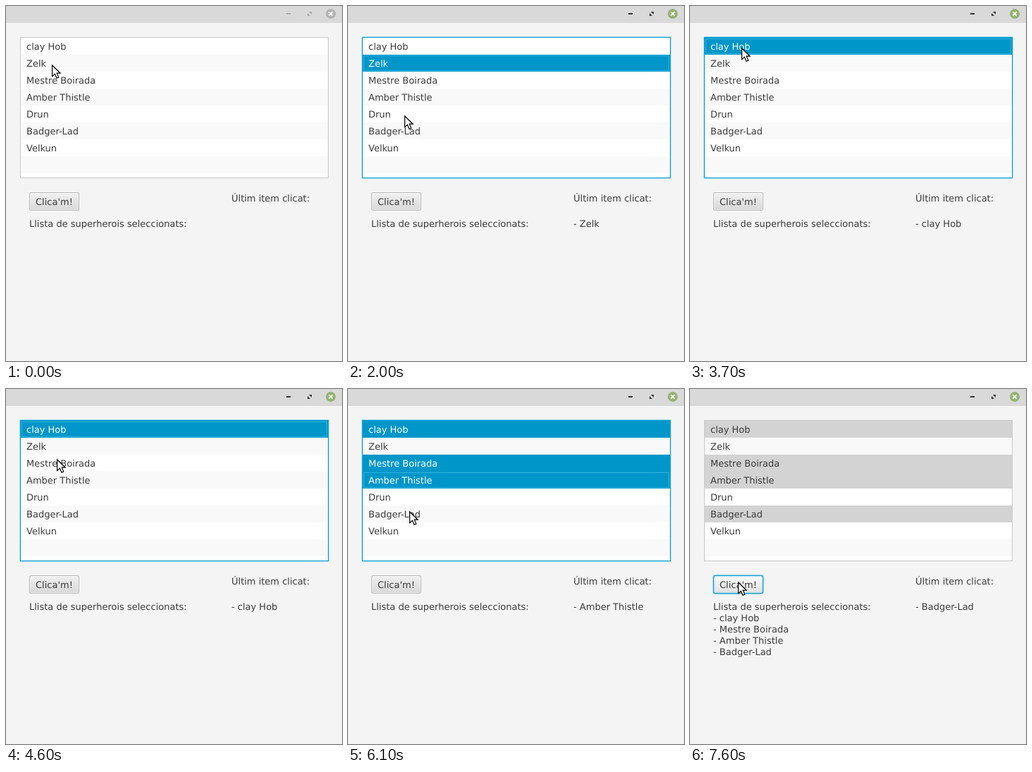
An HTML page that plays this animation: 477x503 px, repeating every 8 s.

```html
<!DOCTYPE html>
<html lang="ca">
<head>
<meta charset="utf-8">
<title>Llista</title>
<style>
html, body { margin: 0; width: 100%; height: 100%; overflow: hidden; background: #f4f4f4; }
svg { display: block; }
text { font: 13px "DejaVu Sans", sans-serif; white-space: pre; text-rendering: geometricPrecision; }
</style>
</head>
<body>
<svg width="477" height="503" viewBox="0 0 477 503">
  <defs>
    <linearGradient id="normal" x2="0" y2="1"><stop stop-color="#efefef"/><stop offset="1" stop-color="#d9d9d9"/></linearGradient>
    <linearGradient id="hover" x2="0" y2="1"><stop stop-color="#f9f9f9"/><stop offset="1" stop-color="#e3e3e3"/></linearGradient>
    <linearGradient id="pressed" x2="0" y2="1"><stop stop-color="#dedede"/><stop offset="1" stop-color="#cbcbcb"/></linearGradient>
    <linearGradient id="bevel" x2="0" y2="1"><stop stop-color="#fcfcfc"/><stop offset="1" stop-color="#ebebeb"/></linearGradient>
  </defs>
  <g id="scene"></g>
  <path id="cursor" d="M.6 1V16.6L4.4 13.2 7 19.3 9.8 18.1 7.2 12.2H12.2Z" fill="#fff" stroke="#000" stroke-width="1.2"/>
</svg>
<script>
const LOOP = 8000, STEP = 100, PRESS = 7500, RELEASE = 7600;
const TOP = 45, ROW = 24, INK = '#3a3a3a';
const heroes = ['clay Hob', 'Zelk', 'Mestre Boirada', 'Amber Thistle', 'Drun', 'Badger-Lad', 'Velkun'];

// Pointer moves between rests; "via" bends the path
const home = [65, 83];
const moves = [
  { from: 500, until: 1100, to: [41, 75], via: [20, 119] },
  { from: 1600, until: 2000, to: [80, 155] },
  { from: 2500, until: 2600, to: [86, 180] },
  { from: 3000, until: 3500, to: [73, 59], via: [95, 115] },
  { from: 3800, until: 4000, to: [72, 88] },
  { from: 4500, until: 4600, to: [72, 99] },
  { from: 5000, until: 5200, to: [79, 122] },
  { from: 5600, until: 5800, to: [94, 189] },
  { from: 6100, until: 6100, to: [87, 173] },
  { from: 6700, until: 7300, to: [68, 273], via: [139, 330] }
];

// Row clicks; from CTRL on, each one adds to the selection
const clicks = [1400, 2300, 2800, 3700, 4800, 5400, 6500], CTRL = 4800;

const rect = (x, y, w, h, fill, extra = '') => `<rect x="${x}" y="${y}" width="${w}" height="${h}" fill="${fill}" ${extra}/>`;
const text = (x, y, s, fill = INK) => `<text x="${x}" y="${y}" fill="${fill}">${s}</text>`;

function pointer(t) {
  let pos = home;
  for (const { from, until, to, via } of moves) {
    if (t < from) break;
    const p = Math.min(1, (t - from + STEP) / (until - from + STEP));
    const s = p * p * (3 - 2 * p), start = pos;
    pos = start.map((a, i) => {
      const mid = via ? via[i] : (a + to[i]) / 2;
      return Math.round(a * (1 - s) ** 2 + 2 * mid * s * (1 - s) + to[i] * s * s);
    });
  }
  return pos;
}

// Selected rows in click order; the last one has the focus
function selection(t) {
  let rows = [];
  for (const time of clicks.filter(c => c <= t)) {
    const row = Math.floor((pointer(time)[1] - TOP) / ROW);
    rows = time < CTRL ? [row] : [...rows, row];
  }
  return rows;
}

function titleBar(active) {
  const ink = active ? '#303030' : '#a9a9a9';
  return rect(0, 0, 477, 24, '#d9d9d9') +
    rect(398, 10, 6, 2, ink) +
    `<path d="M430 8H434V12ZM428 10V14H432Z" fill="${ink}"/>` +
    `<circle cx="461" cy="11" r="7" fill="${active ? '#92b372' : '#b3b3b3'}"/>` +
    `<path d="M458.3 8.3l5.4 5.4m0-5.4l-5.4 5.4" stroke="#fff" stroke-width="1.7"/>`;
}

function listView(selected, focused) {
  let out = focused ? rect(19.7, 43.7, 438.6, 200.6, '#039ed3') : rect(20, 44, 438, 200, '#c8c8c8');
  out += rect(21, TOP, 436, 198, '#fff');
  for (let i = 0; i < 8; i++) {
    const y = TOP + ROW * i, on = selected.includes(i);
    const fill = on ? (focused ? '#0096c9' : '#d3d3d3') : i % 2 ? '#f9f9f9' : '#fff';
    out += rect(21, y, 436, ROW, fill);
    if (focused && i === selected.at(-1)) out += rect(22.5, y + 1.5, 433, 21, 'none', 'stroke="#30b2de"');
    if (heroes[i]) out += text(29, y + 17, heroes[i], on && focused ? '#fff' : INK);
  }
  return out;
}

function button(look, focused) {
  const layer = (inset, radius, fill, drop = 0) =>
    rect(33 + inset, 264 + inset + drop, 71 - 2 * inset, 26 - 2 * inset, fill, `rx="${radius}"`);
  const body = `url(#${look})`;
  const edge = focused ? layer(-.2, 3, '#039ed3') : layer(0, 3, '#fbfbfb', 1) + layer(0, 3, '#b5b5b5');
  const glow = focused ? layer(-1.4, 4, '#039ed322') + layer(2.6, 1, body) : '';
  return edge + layer(1, 2, 'url(#bevel)') + layer(2, 1, body) + glow + text(42, 282, "Clica'm!");
}

function draw(t) {
  const [x, y] = pointer(t), selected = selection(t);
  const active = selected.length > 0, submitted = t >= PRESS;
  const over = x >= 33 && x < 104 && y >= 264 && y < 290;
  const look = submitted && t < RELEASE ? 'pressed' : over ? 'hover' : 'normal';

  let out = titleBar(active) + listView(selected, active && !submitted) + button(look, submitted) +
    text(320, 277, 'Últim item clicat:') + text(33, 313, 'Llista de superherois seleccionats:');
  if (active) out += text(320, 313, '- ' + heroes[selected.at(-1)]);
  if (t >= RELEASE) selected.forEach((row, i) => out += text(33, 329 + 16 * i, '- ' + heroes[row]));

  document.getElementById('scene').innerHTML = out;
  document.getElementById('cursor').setAttribute('transform', `translate(${x} ${y})`);
}

const begin = performance.now();
let shown = -1;
function tick() {
  const t = Math.floor((performance.now() - begin) % LOOP / STEP) * STEP;
  if (t !== shown) draw(shown = t);
  requestAnimationFrame(tick);
}
tick();
</script>
</body>
</html>
```
